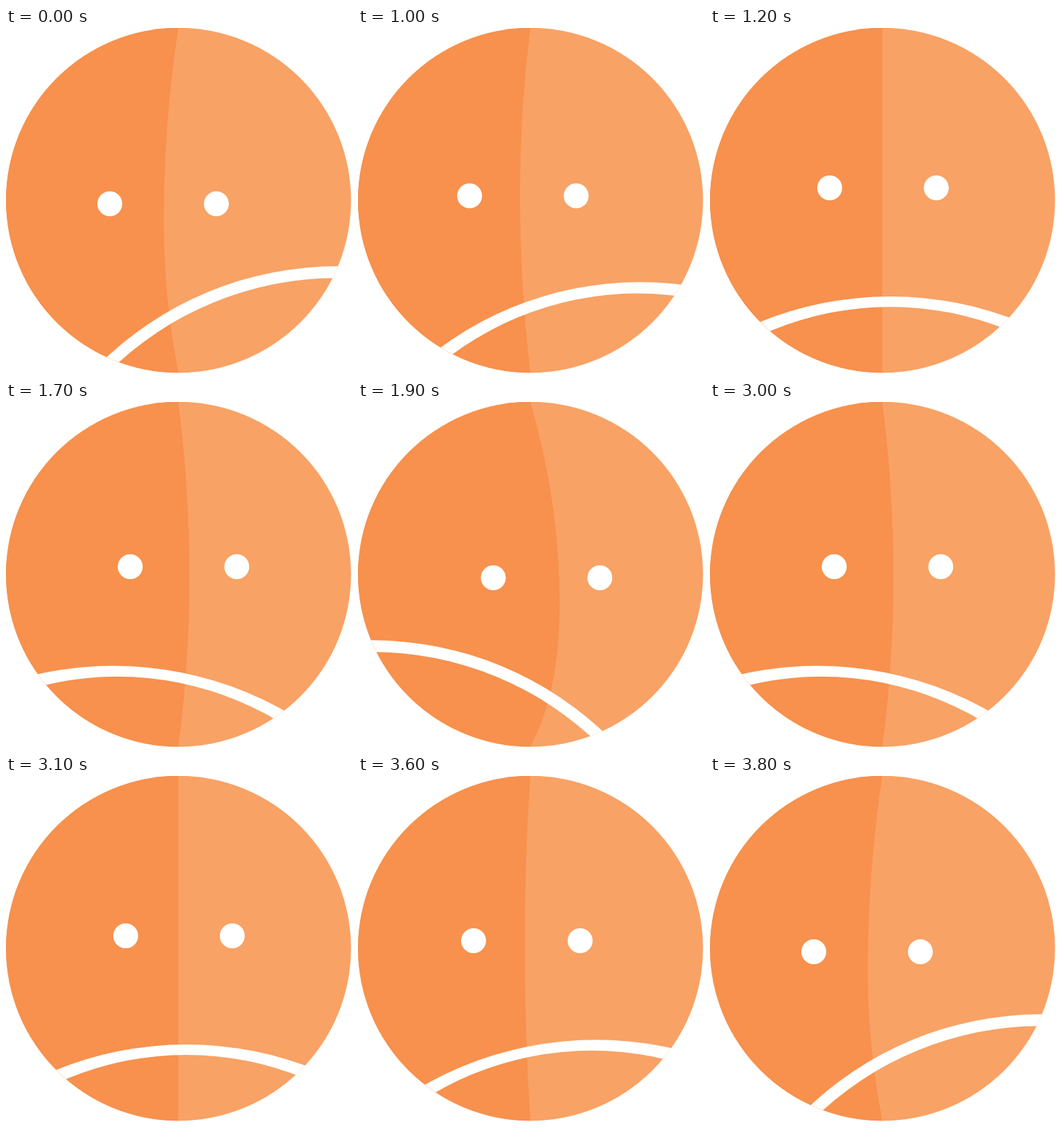
An HTML page for the animation above (3900 ms loop, 500 by 500 pixels).

```html
<!DOCTYPE html>
<html lang="en">
<head>
<meta charset="utf-8">
<title>Frowning face</title>
<style>
  html, body { margin: 0; width: 100%; height: 100%; overflow: hidden; background: #fff; }
  svg { display: block; width: 100%; height: 100%; }
</style>
</head>
<body>
<svg viewBox="0 0 500 500">
  <defs><clipPath id="face"><circle cx="249.3" cy="249" r="249.3"/></clipPath></defs>
  <circle cx="249.3" cy="249" r="249.3" fill="#f8a265"/>
  <g clip-path="url(#face)">
    <path id="shade" fill="#f7914d"/>
    <path id="mouth" fill="#fff" fill-rule="evenodd"/>
  </g>
  <g id="eyes" fill="#fff">
    <circle r="18"/>
    <circle cx="154" r="18"/>
  </g>
</svg>
<script>
const LOOP = 3900;
const el = id => document.getElementById(id);
const shade = el('shade'), mouth = el('mouth'), eyes = el('eyes');

// split: [bulge, height of the bulge, fullness below it]
// outer, inner: [centre x, top y, radius] of the two mouth arcs
const rest = { eye: [173, 231], split: [0, 249, .5], outer: [260.6, 388, 500], inner: [260.5, 403, 448] };
const left = [
  { eye: [179.5, 238], split: [16, 252, .52], outer: [155, 381.3, 505], inner: [161, 396.7, 452] },
  { eye: [184, 242.5], split: [28, 285, .6], outer: [91, 367.2, 488], inner: [95, 383.5, 450] },
  { eye: [195.5, 254], split: [42.5, 292, .62], outer: [20, 344.3, 489], inner: [21, 361.3, 468] }
];

const flip = ([x, top, r]) => [499 - x, top, r];
const mirror = (pose, eyeX, split) => ({
  eye: [eyeX, pose.eye[1]], split, outer: flip(pose.outer), inner: flip(pose.inner)
});
const right = [
  mirror(left[0], 167, [-8, 242, .5]),
  mirror(left[1], 161.3, [-15, 240, .5]),
  mirror(left[2], 150, [-21, 280, .5])
];

const steps = [
  [0, right[2]], [1000, right[1]], [1100, right[0]], [1200, rest],
  [1700, left[0]], [1800, left[1]], [1900, left[2]],
  [2900, left[1]], [3000, left[0]], [3100, rest],
  [3600, right[0]], [3700, right[1]], [3800, right[2]]
];

const ring = ([x, top, r]) =>
  `M${x} ${top}a${r} ${r} 0 0 1 0 ${2 * r}a${r} ${r} 0 0 1 0 ${-2 * r}z`;

function splitPath([bulge, y, full]) {
  const x = 249 + bulge;
  return `M0 0H249Q${x} ${y / 2} ${x} ${y}Q${x} ${y + full * (498 - y)} 249 498V500H0Z`;
}

function draw(ms) {
  const t = ms % LOOP;
  const pose = steps.filter(([start]) => start <= t).pop()[1];
  shade.setAttribute('d', splitPath(pose.split));
  mouth.setAttribute('d', ring(pose.outer) + ring(pose.inner));
  eyes.setAttribute('transform', `translate(${pose.eye})`);
}

const t0 = performance.now();
function tick() {
  draw(performance.now() - t0);
  requestAnimationFrame(tick);
}
tick();
</script>
</body>
</html>
```
